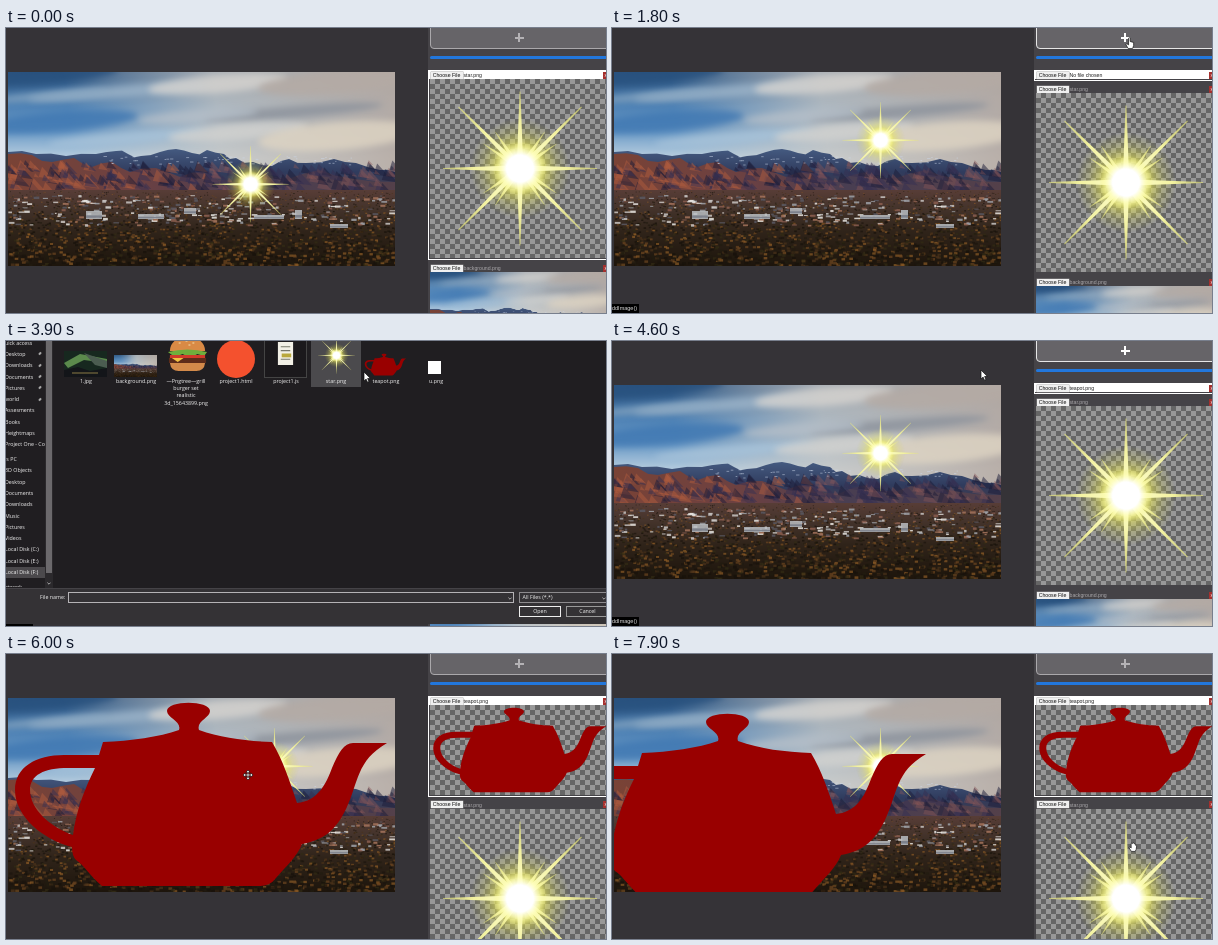
Animation, 600 px wide and 285 px high, one loop 8 s. Source, as an HTML page with a canvas:

```html
<!DOCTYPE html>
<html lang="en">
<head>
<meta charset="utf-8">
<title>Image layer editor</title>
<style>
html, body { margin: 0; width: 100%; height: 100%; overflow: hidden; background: #353337; }
#stage { position: absolute; left: 0; top: 0; width: 600px; height: 285px; overflow: hidden;
  background: #353337; font: 5.2px/9px "Liberation Sans", Arial, sans-serif; }
#stage * { position: absolute; box-sizing: border-box; white-space: nowrap; }
#view { left: 2px; top: 44px; width: 387px; height: 194px; overflow: hidden; }
#side { left: 422px; top: 0; width: 185px; height: 285px; background: #454347; }
#add { left: 424px; top: -6px; width: 190px; height: 27px; border: 1px solid #aaa8ab;
  border-radius: 4px; background: #666468; }
#add i { background: #b4b2b5; }
#add.lit { border-color: #e6e6e6; }
#add.lit i { background: #fff; }
#slider { left: 424px; top: 27.5px; width: 182px; height: 3.5px; border-radius: 2px; background: #2277dc; }
.item { left: 422px; width: 190px; border: 1.5px solid transparent; }
.item.on { border-color: #fff; }
.head { left: 0; top: 0; width: 187px; height: 8px; color: #a9a7aa; }
.on .head { background: #fff; color: #222; }
.head b { left: 1.5px; top: .5px; width: 32px; height: 7px; font-weight: normal; line-height: 6.6px;
  text-align: center; color: #111; background: #f0f0f0; box-shadow: 0 0 0 .4px #999; }
.head span { left: 34.5px; top: 0; line-height: 8px; }
.head u { left: 173.5px; top: .5px; width: 7px; height: 7px; background: #a5302e; color: #fff;
  text-decoration: none; line-height: 6.4px; padding-left: 2px; }
.pic { left: .5px; top: 8px; width: 180px; overflow: hidden;
  background: repeating-conic-gradient(#666 0 25%, #989898 0 50%) 0 0 / 10px 10px; }
#status { left: 0; top: 276px; width: 27px; height: 9px; background: #000; color: #ddd; font-size: 5.5px; }
#dialog { left: 0; top: 0; width: 600px; height: 285px; transform-origin: 285px 98px; color: #f2f2f2;
  font: 5.3px/8px "Open Sans", "Noto Sans", sans-serif; }
#base { left: -40px; top: -100px; width: 680px; height: 382.5px; background: #343235; }
#blank div { background: #fff; }
#cursor svg { overflow: visible; left: 0; top: 0; width: 12px; height: 12px; }
</style>
</head>
<body>
<div id="stage"></div>
<script>
const LOOP = 8000;
const stage = document.getElementById('stage');

function el(parent, tag, css = '', text = '') {
  const e = document.createElement(tag);
  e.style.cssText = css;
  e.textContent = text;
  parent.append(e);
  return e;
}
function named(parent, id) {
  const e = el(parent, 'div');
  e.id = id;
  return e;
}
const rect = (x, y, w, h, more = '') => `left:${x}px;top:${y}px;width:${w}px;height:${h}px;${more}`;
const box = (parent, x, y, w, h, more, text) => el(parent, 'div', rect(x, y, w, h, more), text);
function svg(parent, view, body, css) {
  const holder = el(parent, 'div', css);
  holder.innerHTML = `<svg viewBox="${view}" width="100%" height="100%" preserveAspectRatio="none">${body}</svg>`;
  return holder;
}
function painting(parent, x, y, w, h, baseW, baseH, paint) {
  const c = el(parent, 'canvas', rect(x, y, w, h));
  c.width = w * 2;
  c.height = h * 2;
  const g = c.getContext('2d');
  g.scale(c.width / baseW, c.height / baseH);
  paint(g);
  return c;
}
function seeded(s) {
  return () => (s = (s * 16807) % 2147483647) / 2147483647;
}

// Landscape in a 387 x 194 space
const RIDGE = [0,80, 28,82, 58,84, 88,82, 108,79, 120,82, 133,84, 152,80, 168,77, 184,81, 199,78, 216,82,
  228,86, 245,90, 264,94, 281,87, 298,91, 326,87, 348,91, 372,98, 387,100];
const HILLS = [0,82, 24,83, 44,90, 66,86, 84,95, 104,90, 122,100, 148,96, 172,105, 196,100, 224,109,
  252,100, 280,107, 312,98, 340,106, 387,110];

function land(g, rnd, pts, fill, floor) {
  g.fillStyle = fill;
  g.beginPath();
  g.moveTo(0, floor);
  for (let i = 0; i < pts.length; i += 2) {
    const [x, y, nx, ny] = pts.slice(i, i + 4);
    g.lineTo(x, y);
    if (nx) g.lineTo((x + nx) / 2, (y + ny) / 2 - 2 + rnd() * 5);
  }
  g.lineTo(387, floor);
  g.fill();
}
function ramp(g, x0, y0, x1, y1, stops) {
  const r = g.createLinearGradient(x0, y0, x1, y1);
  for (const [at, color] of stops) r.addColorStop(at, color);
  return r;
}
function landscape(g) {
  const rnd = seeded(77);
  const pick = a => a[Math.floor(rnd() * a.length)];
  g.fillStyle = ramp(g, 0, 0, 0, 86, [[0, '#2f5682'], [.4, '#4f83b6'], [.7, '#6f9dc8'], [1, '#b9cfe0']]);
  g.fillRect(0, 0, 387, 194);
  g.fillStyle = ramp(g, 60, 40, 387, 0, [[0, 'rgba(206,204,200,0)'], [.45, 'rgba(206,202,196,.75)'], [1, 'rgba(184,172,164,.95)']]);
  g.fillRect(0, 0, 387, 110);
  g.filter = 'blur(7px)';
  for (const [x, y, w, h, color] of [
    [30, 4, 80, 9, '#27507d'], [110, 20, 90, 6, '#9db5ca'], [40, 24, 60, 4, '#8ba9c4'], [50, 50, 80, 10, '#3f77b2'],
    [120, 66, 80, 6, '#a8c3da'], [210, 12, 70, 9, '#d6d4d0'], [330, 10, 80, 12, '#b5aaa4'],
    [285, 40, 90, 6, '#8b919b'], [190, 44, 60, 6, '#b5bfc8'], [230, 60, 70, 8, '#d3d3d0'], [330, 64, 80, 14, '#dfd5c4']]) {
    g.globalAlpha = .8;
    g.fillStyle = color;
    g.beginPath();
    g.ellipse(x, y, w, h, -.08, 0, 7);
    g.fill();
  }
  g.filter = 'none';
  g.globalAlpha = 1;
  land(g, rnd, RIDGE, ramp(g, 0, 78, 0, 122, [[0, '#44597f'], [.5, '#303c5e'], [1, '#4a3a44']]), 126);
  land(g, rnd, HILLS, ramp(g, 0, 0, 387, 0, [[0, '#7a4336'], [.35, '#6b4143'], [.6, '#493e52'], [1, '#54404a']]), 130);
  for (let i = 0; i < 260; i++) {
    const x = rnd() * 400, y = 88 + rnd() * 24, w = 4 + rnd() * 9;
    g.fillStyle = pick(['rgba(28,28,56,.5)', x < 200 ? 'rgba(176,92,62,.5)' : 'rgba(140,88,88,.4)', 'rgba(54,48,82,.5)']);
    g.beginPath();
    g.moveTo(x, y);
    g.lineTo(x + w, y + w * 1.1);
    g.lineTo(x - w * .3, y + w * .9);
    g.fill();
  }
  for (let i = 0; i < 60; i++) {
    g.fillStyle = 'rgba(205,216,234,.55)';
    g.fillRect(95 + rnd() * 250, 84 + rnd() * 9, 1 + rnd() * 2.5, .9);
  }
  g.fillStyle = ramp(g, 0, 116, 0, 194, [[0, '#5a3e38'], [.25, '#45342c'], [.55, '#30241a'], [1, '#1d150c']]);
  g.fillRect(0, 118, 387, 76);
  const trees = ['#17120b', '#6b4520', '#8a5a25', '#332c15', '#4a321a', '#221c10', '#1c150d'];
  for (let i = 0; i < 2400; i++) {
    const d = rnd(), r = .7 + d * 1.9;
    g.fillStyle = pick(trees);
    g.globalAlpha = .7;
    g.fillRect(rnd() * 387, 119 + d * 74, r * 1.5, r);
  }
  g.globalAlpha = .85;
  for (let i = 0; i < 320; i++) {
    const d = rnd();
    g.fillStyle = pick(['#c9c6c4', '#9fa3a8', '#8b5f50', '#e9e7e2', '#5a5962', '#a5745c']);
    g.fillRect(rnd() * 387, 123 + d * 30, 1.5 + rnd() * 4.5, .9 + rnd() * 1.6);
  }
  for (const [x, y, w, h] of [[78, 139, 16, 8], [176, 136, 12, 6], [287, 138, 7, 9], [246, 143, 30, 4], [130, 142, 26, 5], [322, 152, 18, 4]]) {
    g.fillStyle = '#b9bec2';
    g.fillRect(x, y, w, h);
    g.fillStyle = '#767b86';
    g.fillRect(x, y + h * .55, w, h * .3);
  }
  g.globalAlpha = 1;
}

// Star in a 180 x 180 space
function star(g) {
  g.translate(90, 89.5);
  const glow = (r, stops) => {
    const f = g.createRadialGradient(0, 0, 0, 0, 0, r);
    for (const [at, color] of stops) f.addColorStop(at, color);
    g.fillStyle = f;
    g.fillRect(-r, -r, 2 * r, 2 * r);
  };
  const ray = (deg, len, half, tip) => {
    g.save();
    g.rotate(deg * Math.PI / 180);
    g.fillStyle = ramp(g, 0, 0, len, 0, [[0, '#ffffd8'], [.6, '#f3f2a0'], [1, 'rgba(232,230,120,.6)']]);
    g.beginPath();
    g.moveTo(0, -half);
    g.lineTo(len, -tip);
    g.lineTo(len, tip);
    g.lineTo(0, half);
    g.fill();
    g.restore();
  };
  glow(50, [[0, 'rgba(245,243,100,.95)'], [.45, 'rgba(236,234,90,.65)'], [.75, 'rgba(225,224,80,.22)'], [1, 'rgba(220,220,60,0)']]);
  for (let a = 0; a < 360; a += 90) {
    ray(a, 77, 3.2, .5);
    ray(a + 45, 87, 2.8, .6);
    ray(a + 34, 44, 3, .2);
    ray(a + 56, 44, 3, .2);
  }
  glow(27, [[0, '#fff'], [.5, '#fff'], [.72, 'rgba(255,255,190,.75)'], [1, 'rgba(250,250,120,0)']]);
}

const POT = `<path fill="#990000" fill-rule="evenodd" d="M161 57C161 46 204 46 204 57C204 64 190 67 193 76
 C215 84 240 87 266 88C277 106 284 128 291 149C312 147 320 130 326 114C333 98 338 89 347 89L381 89
 C350 107 353 128 340 155C330 176 318 186 296 190C291 203 280 212 270 224Q264 232 254 232L96 232
 C84 222 78 211 70 206Q66 202 66 193C38 186 9 163 9 136C9 113 30 101 58 101L93 101L97 88
 C125 87 153 83 173 76C176 67 161 64 161 57ZM89 114L62 114C38 114 24 121 24 136C24 155 44 173 67 181C70 157 79 134 89 114Z"/>`;
const pot = (parent, css) => svg(parent, '2 43 387 194', POT, css);

// Main view
const view = named(stage, 'view');
painting(view, 0, 0, 387, 194, 387, 194, landscape);
const bigStar = painting(view, -44.5, -44.5, 89, 89, 180, 180, star);
const bigPot = pot(view, rect(0, -1, 387, 194));

// Layer list
named(stage, 'side');
const add = named(stage, 'add');
el(add, 'i', rect(83.5, 13.5, 9, 2));
el(add, 'i', rect(87, 10, 2, 9));
named(stage, 'slider');

function layer(name, h) {
  const root = el(stage, 'div');
  root.className = 'item';
  const head = el(root, 'div');
  head.className = 'head';
  el(head, 'b', '', 'Choose File');
  const label = el(head, 'span', '', name);
  el(head, 'u', '', 'x');
  const pic = el(root, 'div');
  pic.className = 'pic';
  return { root, label, pic, h };
}
const potLayer = layer('', 89.5), starLayer = layer('star.png', 179), photoLayer = layer('background.png', 89.5);
pot(potLayer.pic, rect(0, 0, 180, 89.5));
painting(starLayer.pic, 0, 0, 180, 179, 180, 179, star);
painting(photoLayer.pic, 0, 0, 180, 89.5, 387, 194, landscape);

function place(item, y, h, on) {
  item.root.style.top = y + 'px';
  item.root.style.height = h + 11 + 'px';
  item.pic.style.height = h + 'px';
  item.root.classList.toggle('on', on);
  return y + h + 14;
}

const status = named(stage, 'status');
status.textContent = 'ddImage()';

// File dialog
const dialog = named(stage, 'dialog');
named(dialog, 'base');
const blank = named(dialog, 'blank');
box(blank, -40, -100, 319, 280);
box(blank, 70, 180, 48, 6);
box(blank, 122, 180, 50, 8);
box(blank, 122, 161, 50, 11, 'background:#343235;border:solid #c33;border-width:1px 0 1px 1px');
const field = box(dialog, 62, 251, 446, 11, 'padding-left:3px;line-height:10px');
box(dialog, 513, 251, 95, 11, 'border:.7px solid #8d8b8e;padding-left:2.5px;line-height:9.5px', 'All Files (*.*)');
const full = named(dialog, 'full');
box(full, -1, -100, 640, 347, 'background:#201e21');
box(full, -1, 246.5, 640, 1, 'background:#454347');
box(full, 0, 226, 39, 11, 'background:#4b494c');
box(full, 39, 0, 7.5, 247, 'background:#2b292c');
box(full, 39.5, 0, 6.5, 232, 'background:#6b696c');
const chevron = (x, y) => svg(full, '0 0 4 3', '<path d="M.4 .6L2 2.2L3.6 .6" fill="none" stroke="#ddd" stroke-width=".7"/>', rect(x, y, 4, 3));
chevron(41, 241);
chevron(501.5, 255.5);
chevron(596, 255.5);
const FOLDERS = ['uick access', 'Desktop', 'Downloads', 'Documents', 'Pictures', 'world', 'Assesments', 'Books',
  'Heightmaps', 'Project One - Co', 'is PC', '3D Objects', 'Desktop', 'Documents', 'Downloads', 'Music', 'Pictures',
  'Videos', 'Local Disk (C:)', 'Local Disk (E:)', 'Local Disk (F:)', 'etwork'];
FOLDERS.forEach((name, i) => {
  const y = 1.7 + i * 11.28 + (i > 9 ? 3.7 : 0) + (i > 20 ? 3.5 : 0);
  box(full, -1, y - 4, 40, i > 20 ? 4 : 8, 'overflow:hidden', name);
  if (i > 0 && i < 6) box(full, 33, y - 1.5, 2, 3, 'background:#aaa;transform:rotate(40deg)');
});

const hover = box(full, 0, 0, 50, 46, 'background:#4b4a4d');
const FILES = ['1.jpg', 'background.png', '\u2014Pngtree\u2014grill\nburger set\nrealistic\n3d_15643899.png', 'project1.html',
  'project1.js', 'star.png', 'teapot.png', 'u.png'];
FILES.forEach((name, i) => box(full, 50 + i * 50, 37, 60, 30, 'text-align:center;white-space:pre;line-height:7.2px', name));
svg(full, '0 0 43 26', `<rect width="43" height="26" fill="#17281f"/><path d="M0 12L16 3L43 8V12L20 9L4 17Z" fill="#5b8a4c"/>
 <path d="M20 2L31 14L43 17V10Z" fill="#4b5c50"/><path d="M0 19L14 16L26 20L43 17V26H0Z" fill="#131519"/>
 <path d="M8 22H34" stroke="#8a7a45"/>`, rect(58, 10, 43, 26));
painting(full, 108, 13.5, 43, 22, 387, 194, landscape);
svg(full, '0 0 44 34', `<path d="M4 13C4 -6 40 -6 40 13Z" fill="#d98a45"/><path d="M2 14Q22 9 42 14L39 18L32 16L25 20L17 16L9 19Z" fill="#6fae3c"/>
 <path d="M4 17H40V20H4Z" fill="#cf3a2a"/><path d="M3 20H41V25H3Z" fill="#5d2c1a"/><path d="M6 20L18 20L12 24Z" fill="#f2c142"/>
 <path d="M4 25H40Q39 33 31 33H13Q5 33 4 25Z" fill="#d38a4a"/>
 <path d="M13 5h2M20 3h2M27 5h2M23 7h2" stroke="#f6dfa8"/>`, rect(160, -3, 43, 34));
box(full, 211, -1, 38, 38, 'border-radius:50%;background:#f4512e');
box(full, 258, -4, 43, 41, 'background:#1b191c;border:.7px solid #444');
svg(full, '0 0 20 24', `<path d="M2 0H18V24H2Z" fill="#f2f0e6"/><path d="M5 5h10M5 9h10M5 18h10" stroke="#77786a" stroke-width="1.2"/>
 <path d="M6 12H16V16H6Z" fill="#b9a83c"/>`, rect(270, 1, 19, 23));
painting(full, 309, -7, 43, 43, 180, 180, star);
pot(full, rect(358, 12, 43, 23));
box(full, 422, 20, 13, 13, 'background:#fff');

box(full, 34, 252, 30, 8, '', 'File name:');
box(full, 513, 265, 42, 11, 'border:1.2px solid #eee;text-align:center;line-height:9px', 'Open');
box(full, 560, 265, 43, 11, 'border:.7px solid #999;text-align:center;line-height:9.5px', 'Cancel');

// Cursors, hot spot at the origin
const cursor = named(stage, 'cursor');
const ink = 'fill="#fff" stroke="#111" stroke-width=".7" stroke-linejoin="round"';
const shapes = {
  arrow: `<path ${ink} d="M0 0V9L2.1 7.1L3.5 10.2L5 9.5L3.6 6.5H6.4Z"/>`,
  point: `<path ${ink} d="M-.8 .6Q0 -.5 .8 .6V4L4.3 5V8L3.3 11H-1.2L-3.4 7.2L-2.6 6.2L-.8 7.4Z"/>`,
  palm: `<path ${ink} d="M-1.9 -3.4Q-1.2 -4.3 -.6 -3.4L-.3 -4Q.5 -4.6 1 -3.7L1.2 -3.2Q2 -3.6 2.4 -2.8V-1.8Q3.4 -2.2 3.7 -1.2L3.2 2.4L2.2 4.4H-1.6L-4 .8Q-3.8 -.4 -2.8 .2L-1.8 1Z"/>`,
  move: `<path ${ink} d="M0 -5L2 -2.8H.7V-.7H2.8V-2L5 0L2.8 2V.7H.7V2.8H2L0 5L-2 2.8H-.7V.7H-2.8V2L-5 0L-2.8 -2V-.7H-.7V-2.8H-2Z"/>`
};
for (const k in shapes) {
  cursor.insertAdjacentHTML('beforeend', `<svg>${shapes[k]}</svg>`);
  shapes[k] = cursor.lastChild;
}

// Each step: time, x, y
const STAR = [[0, 244, 156], [550, 268, 112]];
const TEAPOT = [[6100, 0, 0], [7150, -67, 11]];
const POINTER = [[0, 244, 156], [550, 268, 112], [650, 268, 112], [1000, 581, 20], [1450, 520, 9], [1750, 520, 9],
  [2650, 234, 60], [2900, 234, 60], [3900, 358, 31], [4050, 374, 27], [4250, 374, 27], [4600, 369, 29], [4900, 369, 29],
  [5600, 242, 121], [6100, 242, 121], [7150, 175, 132], [7300, 175, 132], [7850, 521, 193]];
const LOOKS = [[0, 'none'], [680, 'arrow'], [930, 'point'], [1900, 'arrow'], [5150, 'move'], [7500, 'arrow'], [7650, 'palm']];

const clamp = v => Math.min(1, Math.max(0, v));
function at(track, t) {
  let i = 0;
  while (i < track.length - 2 && t >= track[i + 1][0]) i++;
  const [a, b] = [track[i], track[i + 1]];
  const u = clamp((t - a[0]) / (b[0] - a[0])), k = u * u * (3 - 2 * u);
  return [a[1] + (b[1] - a[1]) * k, a[2] + (b[2] - a[2]) * k];
}
const move = (e, [x, y]) => { e.style.transform = `translate(${x}px,${y}px)`; };
const show = (e, on) => { e.style.display = on ? '' : 'none'; };

function render(t) {
  const added = t >= 1500, loaded = t >= 4850;
  const [sx, sy] = at(STAR, t), [cx, cy] = at(POINTER, t);
  move(bigStar, [sx - 2, sy - 44]);
  move(bigPot, at(TEAPOT, t));
  show(bigPot, loaded);

  let y = 42;
  show(potLayer.root, added);
  potLayer.label.textContent = t < 4200 ? 'No file chosen' : 'teapot.png';
  if (added) y = place(potLayer, y, loaded ? potLayer.h : 0, true);
  y = place(starLayer, y, starLayer.h, !added);
  place(photoLayer, y, photoLayer.h, false);

  add.classList.toggle('lit', t >= 1100 && t < 4950);
  show(status, t >= 1300 && t < 4950);

  const opening = clamp((t - 2600) / 170), closing = clamp((t - 4200) / 150);
  const ready = t >= 2800;
  show(dialog, opening > 0 && closing < 1);
  dialog.style.opacity = opening * (1 - closing);
  dialog.style.transform = `scale(${1 - .0534 * (1 - opening) - .04 * closing})`;
  show(blank, !ready);
  show(full, ready);
  field.style.background = ready ? 'none' : '#fff';
  field.style.border = ready ? '.7px solid #b5b3b6' : 'none';
  field.textContent = t >= 4100 ? 'teapot.png' : '';
  const slot = Math.floor((cx - 60) / 50);
  hover.style.left = 55 + slot * 50 + 'px';
  show(hover, cy < 46 && slot >= 0 && slot < 8);

  move(cursor, [cx, cy]);
  const look = LOOKS.filter(l => l[0] <= t).pop()[1];
  for (const k in shapes) show(shapes[k], k === look);
}

const start = performance.now();
function tick(now) {
  render(Math.max(0, now - start) % LOOP);
  requestAnimationFrame(tick);
}
render(0);
requestAnimationFrame(tick);
</script>
</body>
</html>
```
